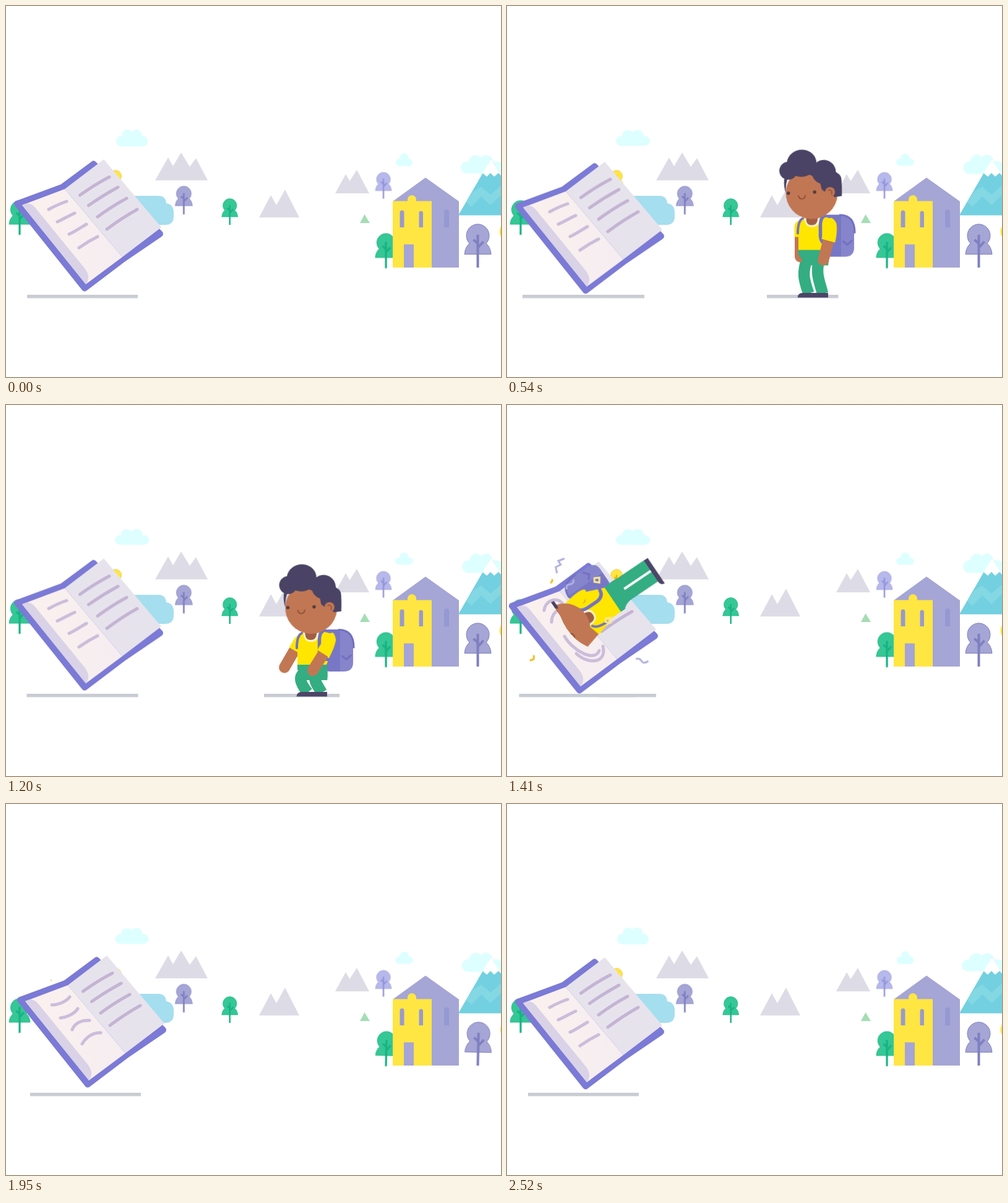
Animation of 800 by 600 pixels, one loop 2550 ms. Source, as an HTML page:

```html
<!DOCTYPE html>
<html lang="en">
<head>
<meta charset="utf-8">
<title>Jump into a book</title>
<style>
html, body { margin: 0; width: 100%; height: 100%; overflow: hidden; background: #fff; }
svg { display: block; width: 800px; height: 600px; }
.line { fill: none; stroke-linecap: round; stroke-linejoin: round; }

/* every moving part shares one clock */
.cloud, .sway, .book, .shade, .boy, .torso, .head, .arm, .leg, .line[id], .bit {
  animation: 2550ms linear infinite;
}

.cloud { fill: #dff; animation-name: puff; }
@keyframes puff {
  0%, 84.7%, 100% { transform: none; }
  11%, 74.5% { transform: scale(var(--sx), var(--sy)); }
}

.sway { animation-name: sway; animation-timing-function: ease-in-out; }
@keyframes sway {
  0%, 11.76%, 21.18%, 47.06%, 55.29%, 98.82%, 100% { transform: none; }
  31.37% { transform: rotate(.8deg); }
  64.31% { transform: rotate(-1.2deg); }
  76.47% { transform: rotate(1.3deg); }
  86.27% { transform: rotate(-.8deg); }
}

.book { animation-name: book; animation-timing-function: ease-in-out; }
@keyframes book {
  0%, 51.37%, 98.82%, 100% { transform: none; }
  25.1% { transform: translate(0, 4px); }
  53.8% { transform: translate(0, 1px); animation-timing-function: linear; }
  55.29% { transform: translate(-10px, 5px); }
  56.47% { transform: translate(-12px, 6px); }
  64.31% { transform: translate(8px, -4px); }
  70.59% { transform: translate(-6px, 3px); }
  76.47% { transform: translate(5px, -3px); }
  86.27% { transform: translate(-4px, 2px); }
}

.shade { fill: #c9cdd3; }
#bookShade { transform-origin: 123.5px 470px; animation-name: bookShade; animation-timing-function: ease-in-out; }
@keyframes bookShade {
  0%, 51.37%, 98.82%, 100% { transform: none; }
  25.1% { transform: scaleX(1.105); }
  53.8% { transform: scaleX(1.02); animation-timing-function: linear; }
  55.29% { transform: translate(-10px) scaleX(1.05); }
  56.47% { transform: translate(-12px) scaleX(1.07); }
  64.31% { transform: translate(8px) scaleX(.97); }
  70.59% { transform: translate(-6px) scaleX(1.03); }
  76.47% { transform: translate(5px); }
  86.27% { transform: translate(-4px) scaleX(1.02); }
}
#boyShade { transform-origin: 478px 470px; animation-name: boyShade; }
@keyframes boyShade {
  0%, 4% { transform: scaleX(0); }
  11.76% { transform: scaleX(.82); }
  16.47% { transform: scaleX(.98); }
  21.18% { transform: scaleX(.943); }
  27% { transform: scaleX(.9); }
  41.18% { transform: scaleX(.92); }
  47.06%, 48.63% { transform: none; }
  52.94% { transform: translate(-150px) scaleX(.7); }
  55.29% { transform: translate(-283px) scaleX(.77); }
  60%, 100% { transform: translate(-330px) scaleX(0); }
}

/* page lines ripple on the dive */
#l1 { animation-name: l1; } #l2 { animation-name: l2; }
#l3 { animation-name: l3; } #l4 { animation-name: l4; }
@keyframes l1 {
  0%, 53.4%, 96%, 100% { d: path("M69 329C78 324 89 319 98 316"); }
  55.29%, 60% { d: path("M70 327C71 313 88 304 99 315"); }
  76.47% { d: path("M69 328C79 328 92 323 98 315"); }
}
@keyframes l2 {
  0%, 53.4%, 96%, 100% { d: path("M83 349C92 345 102 339 111 335"); }
  55.29%, 60% { d: path("M82 346C82 326 104 318 112 330"); }
  76.47% { d: path("M83 349C93 348 105 343 111 334"); }
}
@keyframes l3 {
  0%, 53.4%, 96%, 100% { d: path("M102 369C111 365 121 358 130 353"); }
  55.29%, 60% { d: path("M103 369C116 392 152 412 159 392"); }
  76.47% { d: path("M102 368C106 358 116 352 130 353"); }
}
@keyframes l4 {
  0%, 53.4%, 96%, 100% { d: path("M118 391C128 384 138 378 148 373"); }
  55.29%, 60% { d: path("M122 397C142 416 172 412 165 385"); }
  76.47% { d: path("M118 391C125 379 137 372 148 373"); }
}

.boy { transform-origin: 494px 416.5px; animation-name: boy; }
@keyframes boy {
  0%, 2.35% { transform: translate(0, -440px); opacity: 1; }
  11.76% { transform: none; }
  12.94%, 48.63% { transform: translate(0, 55px) rotate(0deg); }
  50.59% { transform: translate(-40px, -20px) rotate(-22deg); }
  52.94% { transform: translate(-140px, -130px) rotate(-75deg); }
  55.29% { transform: translate(-251px, -149.5px) rotate(-124deg); }
  57.65% { transform: translate(-342px, -87px) rotate(-124deg); }
  60% { transform: translate(-441px, -20px) rotate(-124deg); opacity: 1; }
  60.1%, 100% { transform: translate(-441px, -20px) rotate(-124deg); opacity: 0; }
}
.torso { animation-name: torso; animation-timing-function: ease-in-out; }
@keyframes torso {
  0%, 12.94%, 32%, 40%, 50.59%, 100% { transform: none; }
  16.47% { transform: translate(0, 26px); }
  21.18% { transform: translate(0, 7.5px); }
  25.88% { transform: translate(0, -9px); }
  47.06%, 48.2% { transform: translate(0, 33px); }
}
.head { transform-origin: 492px 283px; animation-name: head; animation-timing-function: ease-in-out; }
@keyframes head {
  0%, 12.94%, 32%, 40%, 52.94%, 100% { transform: none; }
  16.47%, 21.18% { transform: rotate(-8deg); }
  47.06%, 48.63% { transform: rotate(-7deg); }
}
#armL { transform-origin: 474px 295px; animation-name: armL; }
#armR { transform-origin: 526px 293px; animation-name: armR; }
@keyframes armL {
  0%, 12.94%, 32%, 40% { transform: rotate(7deg); }
  16.47% { transform: rotate(4deg); }
  21.18% { transform: rotate(0deg); }
  47.06%, 48.63% { transform: rotate(30deg); }
  54%, 100% { transform: rotate(165deg); }
}
@keyframes armR {
  0%, 12.94%, 32%, 40% { transform: rotate(-5deg); }
  16.47% { transform: rotate(24deg); }
  21.18% { transform: rotate(15deg); }
  47.06%, 48.63% { transform: rotate(32deg); }
  54%, 100% { transform: rotate(170deg); }
}
.leg { fill: none; stroke: #34ad82; stroke-width: 18.5; animation-timing-function: ease-in-out; }
#legL { animation-name: legL; } #legR { animation-name: legR; }
@keyframes legL {
  0%, 12.94%, 25.88%, 40%, 50.59%, 100% { d: path("M487.5 340C487.5 365 487.5 385 487.5 410"); }
  16.47% { d: path("M491 368C474 380 472 388 487.5 410"); }
  21.18% { d: path("M486 350C476 378 480 388 487.5 410"); }
  47.06%, 48.2% { d: path("M492 372C474 380 470 388 487.5 410"); }
}
@keyframes legR {
  0%, 12.94%, 25.88%, 40%, 50.59%, 100% { d: path("M510 340C510 365 510 385 510 410"); }
  16.47% { d: path("M513 368C490 381 503 395 510 410"); }
  21.18% { d: path("M507 350C496 375 506 392 510 410"); }
  47.06%, 48.2% { d: path("M516 372C488 382 502 395 510 410"); }
}

/* confetti: burst out, drop a little, shrink away */
.bit { fill: none; stroke-width: 3; animation-name: bit; }
@keyframes bit {
  0%, 53.7% { transform: translate(130px, 345px) scale(0); }
  55.29% { transform: translate(var(--a)) scale(1); animation-timing-function: ease-out; }
  65% { transform: translate(var(--b)) rotate(60deg) scale(1); animation-timing-function: ease-in; }
  76.47% { transform: translate(var(--c)) rotate(120deg) scale(var(--e, 0)); }
  78%, 100% { transform: translate(var(--c)) rotate(120deg) scale(0); }
}
</style>
</head>
<body>
<svg viewBox="0 0 800 600" xmlns="http://www.w3.org/2000/svg">
  <defs>
    <g id="tree">
      <path fill="currentColor" d="M-21.5-21.5Q-20.5-33-13.5-39A18.5 18.5 0 1 1 13.5-39Q20.5-33 21.5-21.5Z"/>
      <path fill="none" stroke-width="4" d="M0 0V-53M0-32L9-42M0-39L-7-45"/>
    </g>
    <linearGradient id="paper">
      <stop offset="0" stop-color="#fbf1ee"/>
      <stop offset="1" stop-color="#f5edf1"/>
    </linearGradient>
    <clipPath id="dive">
      <path d="M30-700H900V700H330L150 397Q104 388 86 341L30 259Z"/>
    </clipPath>
  </defs>

  <g class="cloud" style="--sx:1.08;--sy:.93;transform-origin:203.5px 213.5px">
    <rect x="178" y="210" width="51" height="17" rx="8.5"/>
    <circle cx="196" cy="208.5" r="8.5"/><circle cx="210.5" cy="208.5" r="8.7"/>
  </g>
  <g class="cloud" style="--sx:1.07;--sy:.93;transform-origin:643.5px 249px">
    <rect x="630" y="246.500" width="27" height="12.500" rx="6.2"/>
    <circle cx="643.5" cy="244.500" r="6.5"/>
  </g>
  <g class="cloud" style="--sx:.93;--sy:1.07;transform-origin:770px 256px">
    <rect x="735" y="251.500" width="70" height="19" rx="9.500"/>
    <circle cx="758.5" cy="253" r="11.500"/><circle cx="776" cy="253" r="11.500"/>
  </g>

  <g fill="#dddce6">
    <path d="M241 282L262 245L270 259L283 237L297 260L307 246L326 282Z"/>
    <path d="M409 342L428 306L437 322L451 297L474 342Z"/>
    <path d="M532 303L549 272L555.5 283L567 265L587 303Z"/>
  </g>
  <path fill="#a5ddb5" d="M572 351L579.5 337L588 351Z"/>

  <path fill="#72d0e0" d="M731 338.500L784 247L837 338.500Z"/>
  <path fill="#83d8e4" d="M755 300L768 292L783 305L800 290V306L783 322L768 308L752 325L744 317Z"/>
  <path fill="#fff" d="M784 247L770 270L777 276L783 270L789 276L796 270L800 274Z"/>

  <path fill="#a5deef" d="M195 307H246Q258 307 259 319Q271 321 271 334V340Q271 354 257 354H195Z"/>
  <g color="#35c795" stroke="#18b284">
    <use href="#tree" transform="translate(22 370) scale(.79)"/>
    <use href="#tree" transform="translate(361.700 354) scale(.605)"/>
    <g class="sway" style="transform-origin:614px 424px">
      <use href="#tree" transform="translate(614 424) scale(.8)"/>
    </g>
  </g>
  <g color="#a5a5d6" stroke="#7f7fc0">
    <use href="#tree" transform="translate(287.300 337) scale(.65)"/>
    <g class="sway" style="transform-origin:762.5px 423px">
      <use href="#tree" transform="translate(762.500 423)"/>
    </g>
  </g>
  <use href="#tree" transform="translate(610 311.500) scale(.605)" color="#b7b8eb" stroke="#9394db"/>
  <use href="#tree" transform="translate(177 301.500) scale(.51)" color="#ffe643" stroke="#e8a800"/>
  <circle class="sway" style="transform-origin:814px 423px" cx="814" cy="365" r="16.5" fill="#ffe643"/>

  <path fill="#a5a5d6" d="M625 316L678 277.500L732 316V423H625Z"/>
  <path fill="#ffe643" d="M625 315.500H649V312.500A7 6.500 0 0 1 663 312.500V315.500H688V423H625Z"/>
  <path fill="#a5a5d6" d="M643 385.500H659V423H643Z"/>
  <path fill="#9999cf" d="M636.500 358V334A3.400 3.400 0 0 1 643.500 334V358ZM667.500 358V334A3.400 3.400 0 0 1 674 334V358Z"/>
  <path fill="#9599d1" d="M708 358V333A4 4 0 0 1 716 333V358Z"/>

  <rect id="bookShade" class="shade" x="34" y="467" width="179" height="5.500"/>
  <rect id="boyShade" class="shade" x="417" y="467" width="122" height="5.500"/>

  <g class="book">
    <path fill="#7b7ad6" stroke="#7b7ad6" stroke-width="10" stroke-linejoin="round" d="M18 320L91 293L141.500 255.500L249 368.500L191 408L127 456.500Z"/>
    <path fill="url(#paper)" d="M26 322L95 296L188 406L129 450Z"/>
    <path fill="#e7e3ed" d="M95 296L158 248L251 358L188 406Z"/>
    <path fill="#dad2e6" d="M26 322Q38 315 47 326L127 424Q138 438 129 450Z"/>
    <g stroke="#cbbdda" stroke-width="5">
      <path class="line" id="l1"/><path class="line" id="l2"/>
      <path class="line" id="l3"/><path class="line" id="l4"/>
    </g>
    <path class="line" stroke="#c4b4d3" stroke-width="5" d="M119.500 306Q143 289 167 276.500M133.500 322.500Q157 306 181 293M148 341Q171 324 195 311M163 361Q187 343 212 329"/>
  </g>

  <g clip-path="url(#dive)">
    <g class="boy">
      <path class="leg" id="legL"/><path class="leg" id="legR"/>
      <path fill="#4d4568" d="M469.500 416.500Q470 409 478 409H519V416.500Z"/>
      <g class="torso">
        <g class="arm" id="armL">
          <path class="line" stroke="#c17753" stroke-width="18" d="M474 297V343"/>
          <path fill="#ffe600" d="M464.500 294A9.500 9.500 0 0 1 483.500 294V311H464.500Z"/>
        </g>
        <path fill="#7877c6" d="M506 275H545V343H524Q510 343 510 328Z"/>
        <path fill="#8685cc" d="M540 275Q561 276 561 295V328Q561 343 546 343H540Z"/>
        <path class="line" stroke="#7270c0" stroke-width="3" d="M538 275.500Q562 276 562 304M543.500 318L550 323.500L557.500 317"/>
        <path fill="#34ad82" d="M471 330H518Q521 345 519.200 357H478.500Q477 345 471 340Z"/>
        <path fill="#ffe600" d="M479 279H515Q533 282 533 294L518 332H471V301Q471 284 479 279Z"/>
        <path fill="#fff6cf" d="M480.500 279H505.500Q506 295 493 295Q480.500 295 480.500 279Z"/>
        <path fill="#a05f45" d="M483.500 276H502V283Q501 292 492.500 292Q484 292 483.500 283Z"/>
        <path class="line" stroke="#7472c0" stroke-width="4" d="M478 281Q470 285 470 305"/>
        <path class="line" stroke="#7472c0" stroke-width="5.500" d="M513 277Q506 280 506.500 295V310Q508 323 520 323.500"/>
        <g class="arm" id="armR">
          <path class="line" stroke="#c17753" stroke-width="18" d="M526 297V350"/>
          <path fill="#ffe600" d="M514.500 318Q514 281 522 281Q536 285 537 318Z"/>
        </g>
        <g class="head">
          <circle cx="498.500" cy="240.500" r="42" fill="#c17753"/>
          <g fill="#4a4365">
            <circle cx="466" cy="199.500" r="14.500"/>
            <ellipse cx="489" cy="190.500" rx="24" ry="22"/>
            <circle cx="522.500" cy="209.500" r="19.500"/>
            <circle cx="537" cy="224" r="12"/>
            <path d="M464 196L457 214Q455 226 457 234Q459 218 464 211Z"/>
            <path d="M480 200L505 214Q516 222 515 236Q520 244 526 243L534 252H546Q549 235 549 222L530 195Z"/>
          </g>
          <circle cx="528" cy="243" r="8" fill="#c17753"/>
          <path class="line" stroke="#9d583b" stroke-width="2" d="M526 239.500Q533 240 530 247"/>
          <circle cx="461" cy="235.500" r="2.800" fill="#553c3f"/>
          <circle cx="503.300" cy="239.500" r="2.800" fill="#553c3f"/>
          <path class="line" stroke="#914f35" stroke-width="2" d="M476.500 242Q477 247.500 482 247.800Q487 247.500 487.500 243"/>
        </g>
      </g>
    </g>
  </g>

  <g stroke="#b0b0e0">
    <path class="bit" style="--a:86px,260px;--b:62px,152px;--c:56px,185px" d="M7-11L-3-7L1-1L-7 3L-5 13"/>
    <path class="bit" style="--a:103px,292px;--b:112px,175px;--c:112px,205px" d="M-6 7Q-9 0-2-1Q6-2 4-9"/>
    <path class="bit" style="--a:218px,413px;--b:262px,385px;--c:268px,415px" d="M-10-2Q-4-4-1 1Q3 7 10 1"/>
  </g>
  <g stroke="#ffe98a">
    <path class="bit" style="--a:145px,284px;--b:178px,165px;--c:186px,195px" d="M-4-3L4-4L4 4L-4 3Z"/>
    <path class="bit" style="--a:163px,349px;--b:235px,225px;--c:246px,255px" d="M-4-3L4-4L4 4L-4 3Z"/>
  </g>
  <g stroke="#f0c020">
    <path class="bit" style="--a:72px,285px;--b:60px,225px;--c:73px,285px;--e:.4" d="M1-3Q2 2-2 3"/>
    <path class="bit" style="--a:42px,410px;--b:22px,375px;--c:16px,400px" d="M1-5Q4 3-5 3"/>
  </g>
</svg>
</body>
</html>
```
